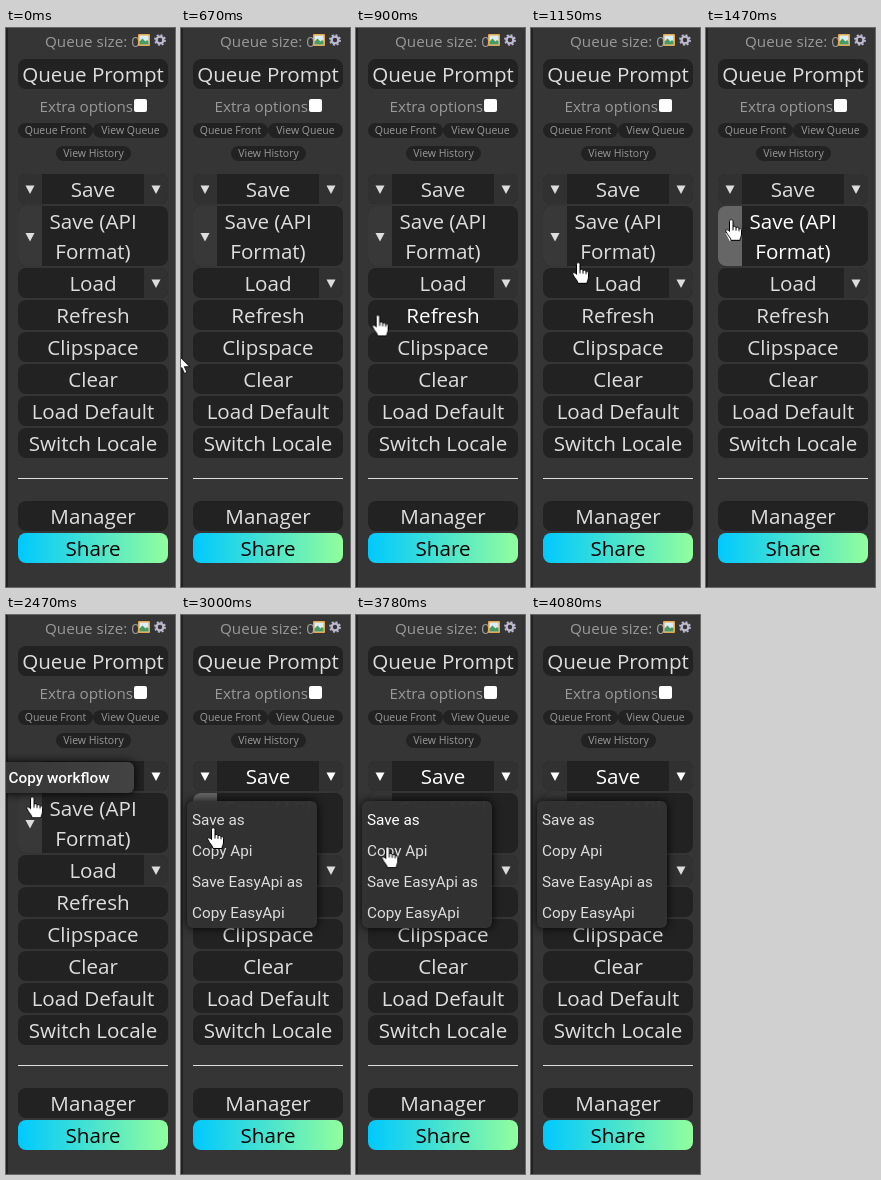
Recreate the animation shown at these times as an HTML page. Size 169x559 px, loop 4880 ms.

```html
<!DOCTYPE html>
<html lang="en">
<head>
<meta charset="utf-8">
<title>Queue menu</title>
<style>
  html, body { margin: 0; width: 100%; height: 100%; overflow: hidden; background: #353535; }
  svg { display: block; width: 100%; height: 100%; }
  text { font-family: "Open Sans", "Noto Sans", sans-serif; text-anchor: middle; fill: #ddd; }
  .btn rect { fill: #222; }
  .btn text { font-size: 20.6px; }
  .btn .side { fill: #313131; }
  .btn .arrow { fill: #ddd; }
  .label text { font-size: 15.2px; fill: #999; text-anchor: start; }
  .pill rect { fill: #222; }
  .pill text { font-size: 10.5px; fill: #999; }
  .popup rect { filter: drop-shadow(0 0 5px #000); }
  .popup text { font: 15.3px Roboto, sans-serif; text-anchor: start; }

  /* Everything shares one 4880 ms clock */
  .anim text, .anim .arrow, .anim .side, .popup, .popup text, .cursor, .cursor g {
    animation: none 4880ms step-end infinite;
  }
  .refresh text { animation-name: refresh; }
  .load text, .load .arrow { animation-name: load; }
  .api text, .api .arrow { animation-name: api; }
  .api .side { fill: #383838; animation-name: api-side; }
  .save text, .save .arrow { animation-name: save; }
  .save .side.left { animation-name: save-side; }
  .copy { opacity: 0; animation-name: copy; }
  .popup.copy text { font-weight: 500; animation-name: copy-text; }
  .menu { opacity: 0; animation-name: menu; }
  .menu text { animation-name: item; animation-delay: calc(var(--i) * 60ms); }
  .cursor { animation-name: move; animation-timing-function: linear; }
  .cursor path { fill: #fff; stroke: #000; stroke-linejoin: round; }
  .cursor .pointer { opacity: 0; animation-name: pointer; }
  .cursor .hand { opacity: 0; animation-name: hand; }

  @keyframes refresh { 17.82% { fill: #fff } 20.28% { fill: #ddd } }
  @keyframes load { 20.28% { fill: #fff } 22.74% { fill: #ddd } }
  @keyframes api {
    24.38% { fill: #fff } 32.37% { fill: #ddd }
    51.43% { fill: #fff } 76.43% { fill: #ddd }
  }
  @keyframes api-side {
    28.48% { fill: #666 } 32.37% { fill: #383838 }
    51.43% { fill: #666 } 76.43% { fill: #383838 }
  }
  @keyframes save { 32.37%, 100% { fill: #fff } }
  @keyframes save-side { 32.37% { fill: #666 } 48.77% { fill: #313131 } }
  @keyframes copy { 42% { opacity: 1 } 61.47% { opacity: 0 } }
  @keyframes copy-text { 48.77%, 100% { fill: #fff } }
  @keyframes menu { 61.47%, 100% { opacity: 1 } }
  @keyframes item { 76.43% { fill: #fff } 77.66% { fill: #ddd } }
  @keyframes pointer {
    13.72% { opacity: 1 } 17% { opacity: 0 }
    81.14% { opacity: 1 } 83.6% { opacity: 0 }
  }
  @keyframes hand { 17% { opacity: 1 } 81.14% { opacity: 0 } }
  @keyframes move {
    0%, 13.72% { transform: translate(-3px, 327px) }
    14.34% { transform: translate(-2px, 326px) }
    17% { transform: translate(12px, 304px) }
    20.49% { transform: translate(35px, 262px) }
    23.56% { transform: translate(47px, 234px) }
    24.38%, 25.15% { transform: translate(47px, 227px) }
    27.66% { transform: translate(32px, 204px) }
    30.12% { transform: translate(25px, 191px) }
    32.37% { transform: translate(23px, 173px) }
    35.24%, 36.2% { transform: translate(23px, 161px) }
    36.27%, 48.7% { transform: translate(24px, 160px) }
    50.61% { transform: translate(26px, 181px) }
    54.71%, 76.4% { transform: translate(32px, 212px) }
    77.87% { transform: translate(31px, 238px) }
    79.5% { transform: translate(26px, 275px) }
    81.14% { transform: translate(11px, 322px) }
    82.58% { transform: translate(-3px, 376px) }
    83.6%, 100% { transform: translate(-20px, 400px) }
  }
</style>
</head>
<body>
<svg viewBox="0 0 169 559">
  <defs>
    <linearGradient id="share"><stop stop-color="#00c9ff"/><stop offset="1" stop-color="#92fe9d"/></linearGradient>
    <linearGradient id="tip"><stop stop-color="#353535"/><stop offset="1" stop-color="#434343"/></linearGradient>
  </defs>
  <rect width="169" height="559" fill="#353535"/>
  <rect width="2" height="559" fill="#222"/>

  <g class="label">
    <text x="39" y="18.5">Queue size: 0</text>
    <text x="33.5" y="84">Extra options</text>
  </g>
  <rect x="128" y="71" width="13" height="13" rx="2" fill="#fff"/>

  <!-- picture and gear icons -->
  <rect x="132" y="6" width="12" height="12" rx="1" fill="#e5a94f"/>
  <rect x="133.5" y="7.5" width="9" height="9" fill="#d8eef8"/>
  <path d="M133.5 16.5v-3l3-3 3 3 1.5-1.5 1.5 1.5v3z" fill="#4c9a63"/>
  <circle cx="154" cy="12" r="3.4" fill="none" stroke="#bcb8cf" stroke-width="2.4"/>
  <circle cx="154" cy="12" r="5" fill="none" stroke="#bcb8cf" stroke-width="1.8" stroke-dasharray="1.96"/>

  <g class="pill">
    <rect x="12" y="95" width="75" height="15" rx="7.5"/><text x="49.5" y="106">Queue Front</text>
    <rect x="87" y="95" width="75" height="15" rx="7.5"/><text x="124.5" y="106">View Queue</text>
    <rect x="50" y="118" width="75" height="15" rx="7.5"/><text x="87.5" y="129">View History</text>
  </g>

  <g class="btn">
    <rect x="12" y="31" width="150" height="30" rx="8"/><text x="87" y="53.5">Queue Prompt</text>
  </g>

  <g class="btn anim save">
    <rect x="12" y="146" width="150" height="30" rx="8"/>
    <path class="side left" d="M36 146v30H20a8 8 0 0 1-8-8v-14a8 8 0 0 1 8-8z"/>
    <path class="side" d="M138 146v30h16a8 8 0 0 0 8-8v-14a8 8 0 0 0-8-8z"/>
    <path class="arrow" d="M19.5 157.5h9l-4.5 8.5zM145.5 157.5h9l-4.5 8.5z"/>
    <text x="87" y="168.5">Save</text>
  </g>

  <g class="btn anim api">
    <rect x="12" y="178" width="150" height="60" rx="8"/>
    <path class="side" d="M36 178v60H20a8 8 0 0 1-8-8v-44a8 8 0 0 1 8-8z"/>
    <path class="arrow" d="M19.5 205h9l-4.5 8.5z"/>
    <text x="87" y="200.5">Save (API</text>
    <text x="87" y="230.5">Format)</text>
  </g>

  <g class="btn anim load">
    <rect x="12" y="240" width="150" height="30" rx="8"/>
    <path class="side" d="M138 240v30h16a8 8 0 0 0 8-8v-14a8 8 0 0 0-8-8z"/>
    <path class="arrow" d="M145.5 251.5h9l-4.5 8.5z"/>
    <text x="87" y="262.5">Load</text>
  </g>

  <g class="btn anim refresh">
    <rect x="12" y="272" width="150" height="30" rx="8"/><text x="87" y="294.5">Refresh</text>
  </g>

  <g class="btn">
    <rect x="12" y="304" width="150" height="30" rx="8"/><text x="87" y="326.5">Clipspace</text>
    <rect x="12" y="336" width="150" height="30" rx="8"/><text x="87" y="358.5">Clear</text>
    <rect x="12" y="368" width="150" height="30" rx="8"/><text x="87" y="390.5">Load Default</text>
    <rect x="12" y="400" width="150" height="30" rx="8"/><text x="87" y="422.5">Switch Locale</text>
    <rect x="12" y="473" width="150" height="30" rx="8"/><text x="87" y="495.5">Manager</text>
  </g>
  <rect x="12" y="450" width="150" height="1" fill="#ddd"/>

  <g class="btn">
    <rect x="12" y="505" width="150" height="30" rx="8" style="fill:url(#share)"/>
    <text x="87" y="527.5" style="fill:#000">Share</text>
  </g>

  <g class="popup copy">
    <rect x="-6" y="147" width="134" height="31" rx="6" fill="url(#tip)"/>
    <text x="2.5" y="168">Copy workflow</text>
  </g>

  <g class="popup menu">
    <rect x="6" y="186" width="130" height="127" rx="6" fill="#353535" fill-opacity=".94"/>
    <text x="11" y="209.5" style="--i:0">Save as</text>
    <text x="11" y="240.5" style="--i:1">Copy Api</text>
    <text x="11" y="271.5" style="--i:2">Save EasyApi as</text>
    <text x="11" y="302.5" style="--i:3">Copy EasyApi</text>
  </g>

  <g class="cursor">
    <g class="pointer">
      <path stroke-width=".8" d="M0 0V16L3.8 12.6 6.4 18.4 8.9 17.3 6.3 11.7H11.5Z"/>
    </g>
    <g class="hand">
      <path transform="translate(-6 0)" d="M4.5 2.5C4.5 .2 8 .2 8 2.5V8C9 7 11 7.3 11 8.8 12 7.8 14 8.4 14 9.8 15 9.2 16.5 9.8 16.5 11.5V15C16.5 18 15 19 15 21.5H6C6 19 3 17 .8 12.5 0 10.8 2.5 9.8 4.5 12.5ZM8 8v3.5M11 8.8v3M14 9.8v2.5"/>
    </g>
  </g>
</svg>
</body>
</html>
```
